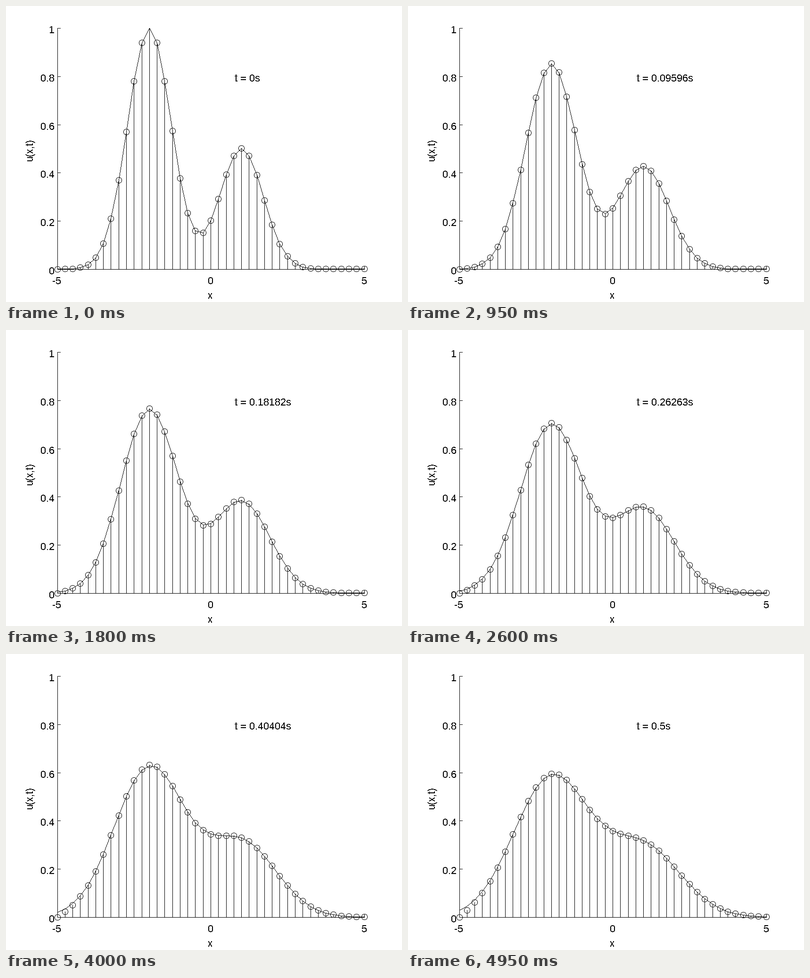
Write a matplotlib script that moves like this. It is 840x631 px and loops after 5000 ms.

```python
import numpy as np
import matplotlib.pyplot as plt
from matplotlib.animation import FuncAnimation

W, H, DPI = 840, 631, 64
FRAMES, INTERVAL, T_END = 100, 50, 0.5
LEFT, RIGHT, TOP, BASE = 109, 760, 47, 561
RADIUS, TICK = 6, 6
FONT_PX = 22

# Whole-pixel glyph hinting, to go with the hard one-pixel lines
plt.rcParams.update({"font.family": "Liberation Sans",
                     "text.hinting": "native", "text.hinting_factor": 1})

x = np.linspace(-5, 5, 41)
dx = x[1] - x[0]


def exact(t):
    """Two spreading Gaussians: the solution on an unbounded line."""
    s = 1 + 4 * t
    return (np.exp(-(x + 2) ** 2 / s) + 0.5 * np.exp(-(x - 1) ** 2 / s)) / np.sqrt(s)


# Central differences in space with the end values held fixed
n = len(x) - 2
laplacian = (np.eye(n, k=1) - 2 * np.eye(n) + np.eye(n, k=-1)) / dx**2
rates, modes = np.linalg.eigh(laplacian)
start = exact(0)
weights = modes.T @ start[1:-1]


def numeric(t):
    inner = modes @ (np.exp(rates * t) * weights)
    return np.concatenate([[0], inner, [start[-1]]])


def to_col(v):
    return np.floor(LEFT + (RIGHT - LEFT) * (v + 5) / 10).astype(int)


def to_row(u):
    """Pixel rows for values, cut off at the top of the axes."""
    return np.floor(BASE - (BASE - TOP) * np.clip(u, 0, 1)).astype(int)


def stroke(img, x0, y0, x1, y1):
    """Hard-edged line, one pixel wide."""
    count = max(abs(x1 - x0), abs(y1 - y0)) + 1
    px = np.floor(np.linspace(x0, x1, count) + 0.5).astype(int)
    py = np.floor(np.linspace(y0, y1, count) + 0.5).astype(int)
    img[py, px] = 0


angles = np.linspace(0, 2 * np.pi, 36, endpoint=False)
ring_x = np.rint(RADIUS * np.cos(angles)).astype(int)
ring_y = np.rint(RADIUS * np.sin(angles)).astype(int)


def ring(img, cx, cy):
    img[cy + ring_y, cx + ring_x] = 0


fig = plt.figure(figsize=(W / DPI, H / DPI), dpi=DPI, facecolor="white")
ax = fig.add_axes([0, 0, 1, 1])
ax.axis("off")


def label(px, py, text, ha="center", rotation=0):
    return ax.text(px, py, text, ha=ha, va="baseline", rotation=rotation,
                   rotation_mode="anchor", fontsize=FONT_PX * 72 / DPI,
                   color="black", antialiased=False)


# Axes, ticks and labels
backdrop = np.full((H, W), 255, dtype=np.uint8)
stroke(backdrop, LEFT, TOP, LEFT, BASE)
stroke(backdrop, LEFT, BASE, RIGHT, BASE)
for v in (0, 0.2, 0.4, 0.6, 0.8, 1):
    row = round(BASE - (BASE - TOP) * v)
    stroke(backdrop, LEFT, row, LEFT + TICK, row)
    label(103, row + 11, f"{v:g}", ha="right")
for v in (-5, 0, 5):
    col = int(to_col(v))
    stroke(backdrop, col, BASE - TICK, col, BASE)
    label(col - (1 if v < 0 else 0), 593, f"{v}")
label(432.5, 624, "x")
label(57, 306.5, "u(x,t)", rotation=90)

picture = ax.imshow(backdrop, cmap="gray", vmin=0, vmax=255, aspect="auto",
                    interpolation="nearest", extent=(0, W, H, 0))
clock = label(485, 161, "", ha="left")
cols = to_col(x)


def update(i):
    t = T_END * i / (FRAMES - 1)
    img = backdrop.copy()
    u = numeric(t)
    for col, row, value in zip(cols, to_row(u), u):
        stroke(img, col, BASE, col, row)
        if value <= 1:
            ring(img, col, row)
    points = list(zip(cols, to_row(exact(t))))
    for a, b in zip(points, points[1:]):
        stroke(img, *a, *b)
    picture.set_data(img)
    clock.set_text(f"t = {t:.5g}s")
    return picture, clock


anim = FuncAnimation(fig, update, frames=FRAMES, interval=INTERVAL,
                     repeat=True, repeat_delay=0, blit=False)
plt.show()
```
